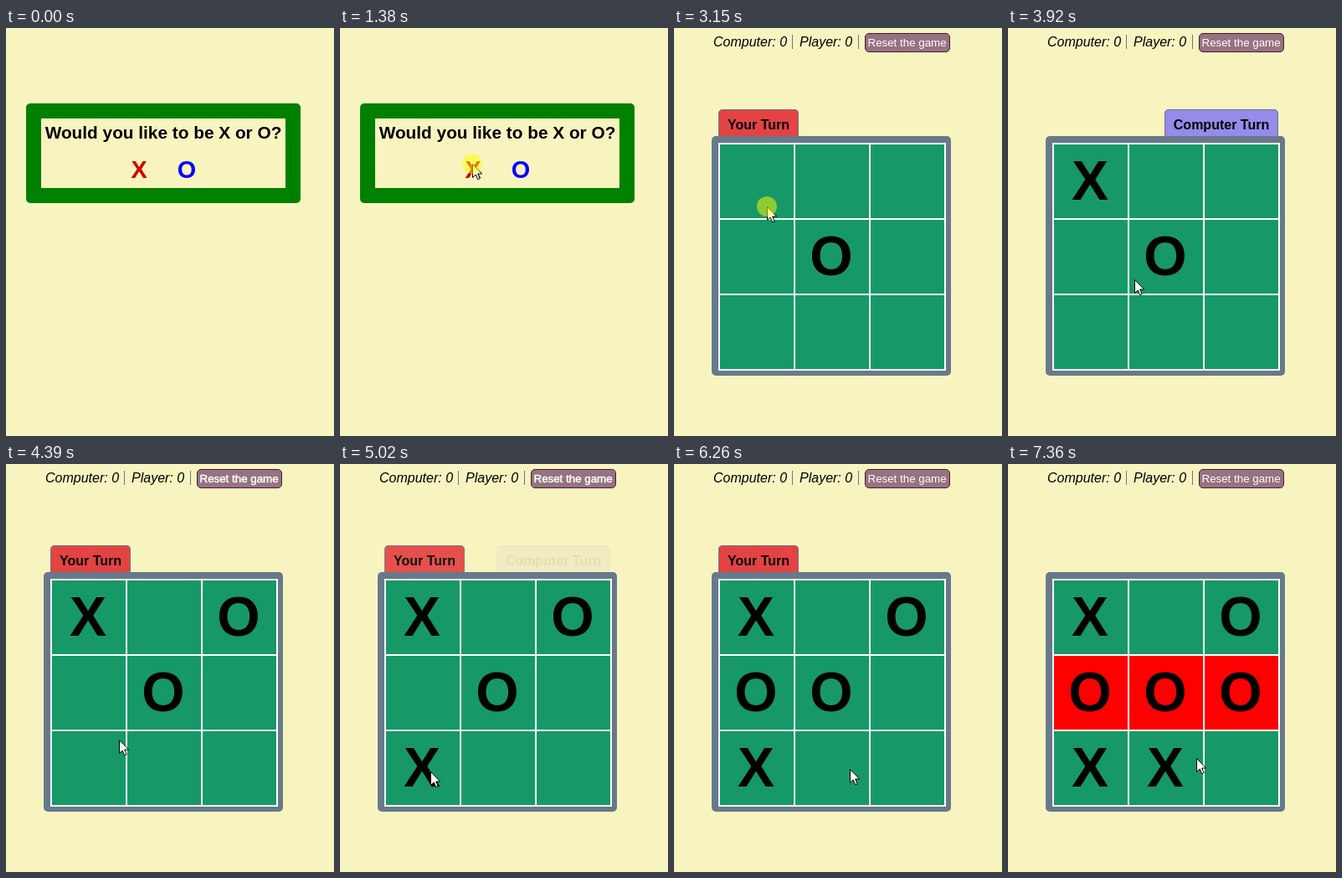
Write an HTML page that moves like this. It is 392 px wide and 487 px high and loops after 8000 ms.

```html
<!DOCTYPE html>
<html lang="en">
<head>
<meta charset="utf-8">
<title>Tic-tac-toe</title>
<style>
  html, body { margin: 0; width: 100%; height: 100%; overflow: hidden; background: #f8f4c0; }
  svg { display: block; width: 392px; height: 487px; font: 16px "Liberation Sans", Arial, sans-serif; }
  .bold { font-weight: bold; }
  .mid { text-anchor: middle; }
  .mark { font-size: 66px; }
</style>
</head>
<body>
<svg viewBox="0 0 392 487">
  <g id="dialog" class="bold mid">
    <rect x="24" y="90" width="328" height="119" rx="5" fill="#008000"/>
    <rect x="42" y="108" width="292" height="83" fill="#f8f4c0"/>
    <text x="188" y="132" font-size="20.8">Would you like to be X or O?</text>
    <text x="159" y="179" font-size="28.8" fill="#d00000">X</text>
    <text x="216" y="179" font-size="28.8" fill="#00f">O</text>
  </g>
  <g id="game">
    <g font-style="italic">
      <text x="47" y="22">Computer: 0</text>
      <text x="150" y="22">Player: 0</text>
    </g>
    <path d="M141.5 8V25M220.5 8V25" stroke="#67798a"/>
    <rect x="228.5" y="6.5" width="101" height="22" rx="4.5" fill="#967380" stroke="#4c1a38"/>
    <text id="reset" x="231.5" y="22" font-size="13.333" fill="#fff" stroke="#fff">Reset the game</text>
    <g id="yourTab" class="bold mid">
      <path d="M53.5 131V102q0-4.500 4.500-4.500H144q4.500 0 4.500 4.500V131" fill="#e44343" stroke="#67798a"/>
      <text x="101" y="121">Your Turn</text>
    </g>
    <g id="computerTab" class="bold mid">
      <path d="M187.500 131V102q0-4.500 4.500-4.500H318q4.500 0 4.500 4.500V131" fill="#958bea" stroke="#67798a"/>
      <text x="255" y="121">Computer Turn</text>
    </g>
    <rect x="45" y="129" width="286" height="286" rx="5" fill="#67798a"/>
    <rect x="53" y="137" width="272" height="272" fill="#fff"/>
    <g id="cells"></g>
    <g id="marks" class="bold mid mark"></g>
  </g>
  <path id="cursor" d="M.5.5V16.500L4.200 13 6.700 18.700 9.200 17.600 6.700 12H11.700Z" fill="#fff" stroke="#000"/>
  <circle id="click" r="12" fill="#ff0" opacity=".5"/>
</svg>
<script>
const LOOP = 8000, GAME_START = 1600, WIN = 7360, FADE = 400;
const $ = id => document.getElementById(id);

function add(parent, tag, attributes, text = '') {
  const node = document.createElementNS('http://www.w3.org/2000/svg', tag);
  for (const name in attributes) node.setAttribute(name, attributes[name]);
  node.textContent = text;
  parent.append(node);
  return node;
}

const cells = Array.from({ length: 9 }, (_, i) => add($('cells'), 'rect', {
  x: 55 + i % 3 * 90, y: 139 + Math.floor(i / 3) * 90, width: 88, height: 88
}));

// Each move: time, cell, mark.
const moves = [
  [2580, 4, 'O'], [3230, 0, 'X'], [4000, 2, 'O'], [4950, 6, 'X'],
  [5670, 3, 'O'], [6640, 7, 'X'], [WIN, 5, 'O']
].map(([time, cell, mark]) => ({
  time, mark,
  node: add($('marks'), 'text', { x: 98 + cell % 3 * 90, y: 205 + Math.floor(cell / 3) * 90 }, mark)
}));

// Pointer route: time, x, y.
const route = [
  [680, 236, 488], [1370, 158, 162], [1860, 158, 162], [2090, 158, 181],
  [2550, 158, 181], [3080, 111, 213], [3230, 111, 213], [3480, 126, 239],
  [3920, 151, 300], [4310, 140, 322], [4800, 108, 367], [5300, 108, 367],
  [6030, 170, 384], [6110, 182, 383], [6250, 210, 364], [6640, 210, 364],
  [7040, 225, 351], [LOOP, 225, 351]
];
const clicks = [[1370, 1450], [3130, 3230], [4870, 4950], [6560, 6640]];

function pointerAt(t) {
  const i = Math.max(1, route.findIndex(point => point[0] > t));
  const [t0, x0, y0] = route[i - 1], [t1, x1, y1] = route[i];
  const p = Math.max(0, (t - t0) / (t1 - t0));
  return [x0 + (x1 - x0) * p, y0 + (y1 - y0) * p];
}

const swing = p => 0.5 - Math.cos(Math.PI * Math.min(1, Math.max(0, p))) / 2;
const show = (node, visible) => { node.style.display = visible ? '' : 'none'; };

function draw(t) {
  show($('dialog'), t < GAME_START);
  show($('game'), t >= GAME_START);
  for (const move of moves) show(move.node, t >= move.time);

  // Every move hands the turn over with a cross-fade.
  const last = moves.filter(move => move.time <= t).pop();
  const since = t - (last ? last.time : 1860);
  const fade = swing(since / FADE);
  const won = t >= WIN;
  const computerNext = !last || last.mark === 'X';
  const incoming = $(computerNext ? 'computerTab' : 'yourTab');
  const outgoing = $(computerNext ? 'yourTab' : 'computerTab');
  incoming.style.opacity = won ? 0 : fade;
  outgoing.style.opacity = won || !last ? 0 : 1 - fade;
  const fading = !won && since > 0 && since < FADE;
  $('reset').setAttribute('stroke-width', fading ? 0.5 : 0);

  cells.forEach((cell, i) =>
    cell.setAttribute('fill', won && i >= 3 && i < 6 ? '#f00' : '#169966'));

  const position = `translate(${pointerAt(t).map(Math.round)})`;
  $('cursor').setAttribute('transform', position);
  $('click').setAttribute('transform', position);
  show($('cursor'), t >= 680);
  show($('click'), clicks.some(([from, to]) => t >= from && t < to));
}

const start = performance.now();
function tick() {
  draw((performance.now() - start) % LOOP);
  requestAnimationFrame(tick);
}
tick();
</script>
</body>
</html>
```
